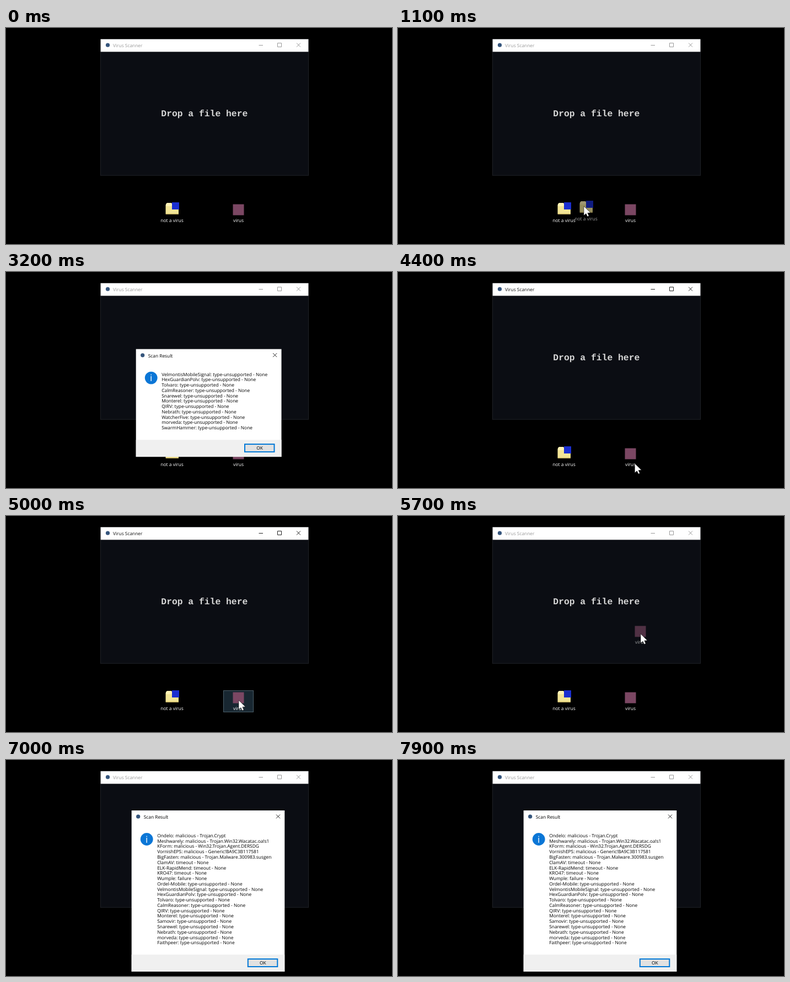
Recreate the animation shown at these times as an HTML page. Size 700 px wide and 394 px high, loop 8 s.

```html
<!DOCTYPE html>
<html lang="en">
<head>
<meta charset="utf-8">
<title>Virus Scanner</title>
<style>
html, body { margin: 0; width: 100%; height: 100%; overflow: hidden; background: #000; }
svg { display: block; width: 100%; height: 100%; }
text { font: 8.4px "Open Sans", "Noto Sans", sans-serif; white-space: pre; text-rendering: geometricPrecision; }
.label { font-size: 8.5px; fill: #fff; text-anchor: middle; }
.message { font: bold 16.35px "Liberation Mono", "DejaVu Sans Mono", monospace; fill: #d8d8d8; text-anchor: middle; }
.info { font-size: 17px; fill: #fff; text-anchor: middle; }
.line { fill: none; stroke-width: 1; }
</style>
</head>
<body>
<svg id="stage" viewBox="0 0 700 394"></svg>
<script>
const LOOP = 8000, STEP = 100;
const stage = document.getElementById("stage");

const unsupported = names => names.split(" ").map(name => name + ": type-unsupported - None");

const firstReport = unsupported(
  "VelmontisMobileSignal HexGuardianPolv Tolvaro CalmReasoner Snarewel Monterel " +
  "QIRV Nebrath WatcherFive morveda SwarmHammer");

const secondReport = [
  "Ondelo: malicious - Trojan.Crypt",
  "Meshwarely: malicious - Trojan.Win32.Wacatac.oa!s1",
  "KForm: malicious - Win32.Trojan.Agent.DERSDG",
  "VornishEPS: malicious - Generic!BA9C3B117581",
  "BigFasten: malicious - Trojan.Malware.300983.susgen",
  "ClamAV: timeout - None",
  "ELK-RapidMend: timeout - None",
  "KRO47: timeout - None",
  "Wumple: failure - None",
  ...unsupported(
    "Ordel-Mobile VelmontisMobileSignal HexGuardianPolv Tolvaro CalmReasoner QIRV " +
    "Monterel Samovir Snarewel Nebrath morveda Faithpeer")
];

const rect = (x, y, w, h, fill, more = "") =>
  `<rect x="${x}" y="${y}" width="${w}" height="${h}" fill="${fill}" ${more}/>`;
const text = (x, y, content, more = "") => `<text x="${x}" y="${y}" ${more}>${content}</text>`;
const appMark = (x, y) => `<circle cx="${x}" cy="${y}" r="3.6" fill="#35557c"/>`;
const cross = (x, y) => `<path class="line" d="M${x} ${y}l7 7m0 -7l-7 7"/>`;
const group = (id, content) => `<g id="${id}">${content}</g>`;

const scanner =
  rect(171.5, 20.5, 377, 248.5, "#0b0d13", 'stroke="#1f2126"') +
  rect(171.6, 20.4, 376.8, 23, "#fff") + appMark(184.5, 31.2) +
  group("title", text(194, 35, "Virus Scanner")) +
  group("buttons", '<path class="line" d="M458.5 31.5h7.5M492.5 27.5h7v7h-7z"/>' + cross(527, 27.5)) +
  text(359.8, 160.5, "", 'id="message" class="message"');

const folder = rect(289.5, 322, 23.5, 18, "#f3e596", 'rx="1"') +
  '<path d="M290 325v-4l2 -2h8l2 3v3z" fill="#fff3b5"/>' +
  rect(290, 338.5, 23, 1.5, "#c9b564") + rect(301, 318, 13, 13, "#1b2fd0") +
  text(301, 353.7, "not a virus", 'class="label"');

const archive = rect(411.5, 321.5, 20, 20, "#7b4763") +
  text(421.5, 354, "virus", 'class="label"');

const selection = x => rect(x, 318.5, 54, 39, "#182731", 'stroke="#4c5f69"');

function dialog(id, x, y, w, h, lines) {
  const right = x + w, bottom = y + h;
  const rows = lines.map((line, i) => text(x + 46.5, y + 48.9 + i * 9.77, line)).join("");
  return group(id,
    rect(x, y, w, h, "#fff") +
    rect(x, bottom - 31, w, 31, "#f0f0f0") +
    appMark(x + 12, y + 11.2) + text(x + 22, y + 14.9, "Scan Result") +
    `<g stroke="#222">${cross(right - 15.3, y + 7.5)}</g>` +
    `<circle cx="${x + 27.5}" cy="${y + 52.5}" r="11.4" fill="#0b76d6"/>` +
    text(x + 27.5, y + 58.7, "i", 'class="info"') + rows +
    rect(right - 66.5, bottom - 23, 53.5, 14, "#e1e1e1", 'class="ok" stroke="#0078d7" stroke-width="2"') +
    text(right - 39.5, bottom - 12.8, "OK", 'text-anchor="middle"'));
}

stage.innerHTML = rect(0, 0, 700, 394, "#000") + scanner +
  group("folderSelection", selection(273.5)) + group("archiveSelection", selection(394.5)) +
  folder + archive +
  group("folderGhost", folder) + group("archiveGhost", archive) +
  dialog("firstDialog", 235.7, 140.6, 263.8, 196.5, firstReport) +
  dialog("secondDialog", 227.7, 92, 277.6, 294, secondReport) +
  group("cursor", '<path d="M0 0V17L4 13.6L6.5 19L9.2 17.8L6.8 12.4L12.2 12Z" fill="#fff" stroke="#111" stroke-width=".6"/>');

const part = Object.fromEntries([...stage.querySelectorAll("[id]")].map(el => [el.id, el]));
const okButton = part.firstDialog.querySelector(".ok");
part.folderGhost.setAttribute("opacity", .62);
part.archiveGhost.setAttribute("opacity", .62);

// Cursor trips: [time, x, y]
const trips = [
  [[100, 178, 386], [700, 297, 330], [900, 297, 328], [1100, 337, 325], [1600, 355, 217],
   [1900, 355, 217], [2500, 127.5, 381.5]],
  [[3300, 440, 391], [3600, 460, 320], [4000, 460, 322], [4200, 440, 372], [4500, 424, 338],
   [4700, 422, 336], [5200, 422, 336], [5400, 434, 256], [5700, 440, 215], [6200, 440, 215],
   [6500, 126, 310]],
  [[7500, 60, 392], [7800, 25, 374]]
];

function cursorAt(t) {
  const trip = trips.find(keys => t >= keys[0][0] && t <= keys.at(-1)[0]);
  if (!trip) return null;
  const next = Math.max(1, trip.findIndex(key => key[0] >= t));
  const [t0, x0, y0] = trip[next - 1], [t1, x1, y1] = trip[next];
  const k = (t - t0) / (t1 - t0);
  return [x0 + (x1 - x0) * k, y0 + (y1 - y0) * k];
}

const within = (t, from, to) => t >= from && t < to;
const show = (el, on) => el.setAttribute("visibility", on ? "visible" : "hidden");
const move = (el, x, y) => el.setAttribute("transform", `translate(${x} ${y})`);

function drag(ghost, on, point, grabX, grabY) {
  show(ghost, on);
  if (on) move(ghost, point[0] - grabX, point[1] - grabY);
}

function draw(t) {
  const point = cursorAt(t);
  show(part.cursor, point);
  if (point) move(part.cursor, ...point);

  const active = within(t, 3800, 5300) || within(t, 5800, 7000);
  part.title.setAttribute("fill", active ? "#111" : "#999");
  part.buttons.setAttribute("stroke", active ? "#222" : "#999");
  const scanning = within(t, 1900, 3800) || t >= 6300;
  part.message.textContent = scanning ? "Scanning..." : "Drop a file here";

  show(part.folderSelection, within(t, 700, 1000));
  show(part.archiveSelection, within(t, 4500, 5300));
  drag(part.folderGhost, within(t, 1000, 1700), point, 297, 328);
  drag(part.archiveGhost, within(t, 5300, 5800), point, 422, 336);

  show(part.firstDialog, within(t, 2700, 3800));
  show(part.secondDialog, t >= 7000);
  okButton.setAttribute("fill", within(t, 3600, 3800) ? "#e5f1fb" : "#e1e1e1");
}

const start = performance.now();
function tick() {
  const t = (performance.now() - start) % LOOP;
  draw(Math.floor(t / STEP) * STEP);
  requestAnimationFrame(tick);
}
tick();
</script>
</body>
</html>
```
